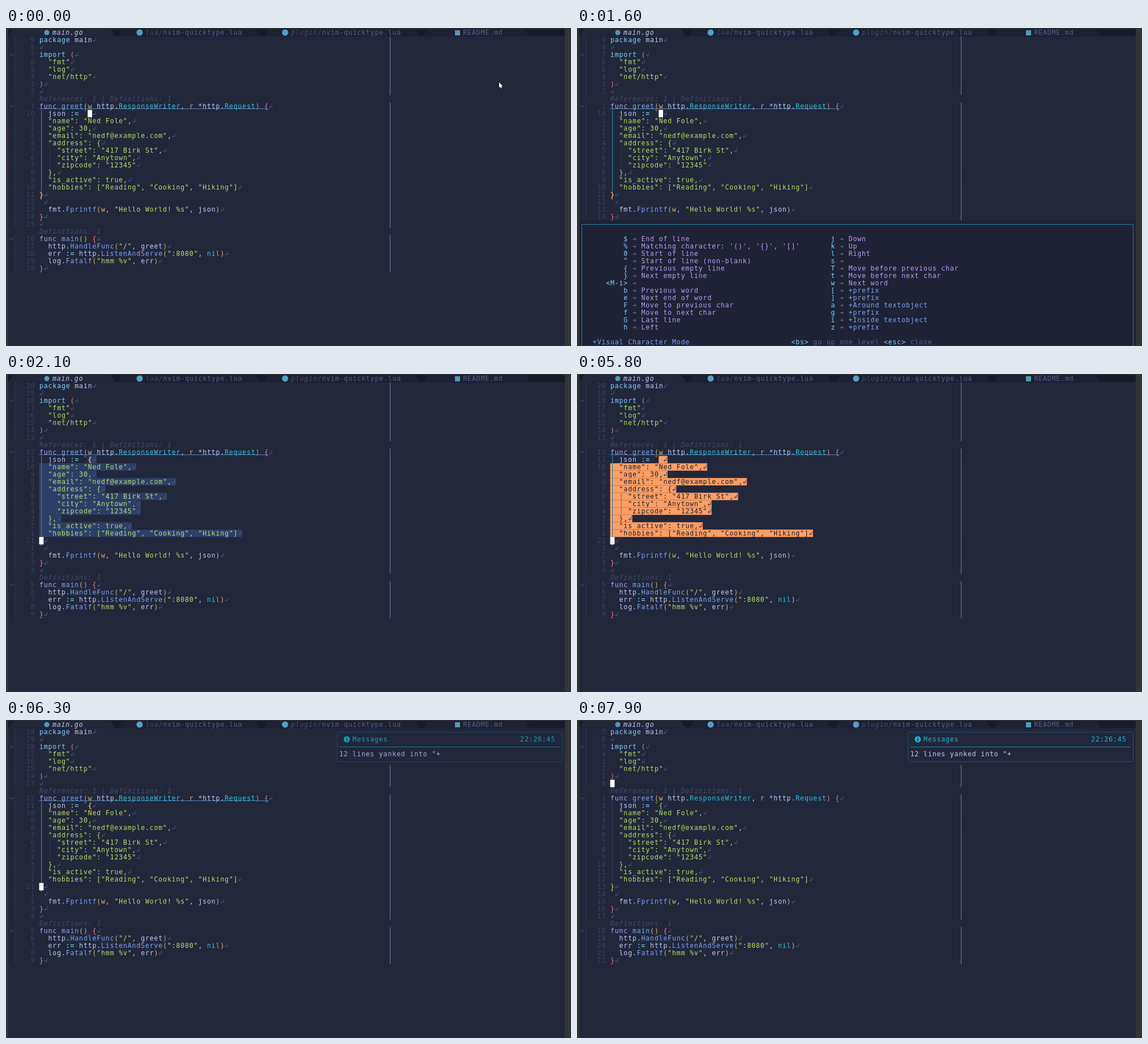
Write an HTML page with a canvas that moves like this. It is 998 by 561 pixels and loops after 8000 ms.

```html
<!DOCTYPE html>
<html lang="en">
<head>
<meta charset="utf-8">
<title>Editor session</title>
<style>
html, body { margin: 0; width: 100%; height: 100%; overflow: hidden; background: #333435; }
canvas { display: block; }
</style>
</head>
<body>
<canvas id="stage" width="998" height="561"></canvas>
<script>
const ctx = document.getElementById('stage').getContext('2d');
const LOOP = 8000, STEP = 100;
const X0 = 58.6, CELL = 7.79, ROW_H = 13;
const FONT = '11.6px "DejaVu Sans Mono", monospace';
const FRAME = '#333435', BG = '#22273a', DARK = '#171b29', TAB = '#1d2132', PANEL = '#1f2335';

// Space the font out to the terminal's cell width.
ctx.font = FONT;
const SPACING = CELL - ctx.measureText('0').width;
ctx.letterSpacing = `${SPACING}px`;

const COLORS = {
  c: '#7dcfff', f: '#c0caf5', r: '#f7768e', s: '#b3de68', k: '#bb9af7', b: '#7aa2f7',
  y: '#e0af68', t: '#2ac3de', o: '#89ddff', m: '#ff9e64', v: '#434b69', n: '#3b4261', d: '#565f89'
};

// Segments are separated by "~"; the first letter of each is its colour key.
const ROWS = [
  'cpackage~f main',
  '',
  'cimport ~r(',
  's  "fmt"',
  's  "log"',
  's  "net/http"',
  'r)',
  '',
  'vReferences: 1 | Definitions: 1',
  'kfunc ~bgreet~y(w ~fhttp~o.~tResponseWriter~o, ~yr ~o*~fhttp~o.~tRequest~r) {',
  'f  json ~o:= ~s`~m{',
  's  "name": "Ned Fole",',
  's  "age": 30,',
  's  "email": "nedf@example.com",',
  's  "address": {',
  's    "street": "417 Birk St",',
  's    "city": "Anytown",',
  's    "zipcode": "12345"',
  's  },',
  's  "is_active": true,',
  's  "hobbies": ["Reading", "Cooking", "Hiking"]',
  'm}',
  's`',
  'f  fmt~o.~bFprintf~y(w~o, ~s"Hello World! %s"~o, ~fjson~y)',
  'r}',
  '',
  'vDefinitions: 1',
  'kfunc ~bmain~y() ~r{',
  'f  http~o.~bHandleFunc~y(~s"/"~o, ~fgreet~y)',
  'f  err ~o:= ~fhttp~o.~bListenAndServe~y(~s":8080"~o, ~tnil~y)',
  'f  log~o.~bFatalf~y(~s"hmm %v"~o, ~ferr~y)',
  'r}'
].map(src => src ? src.split('~').map(s => [s[0], s.slice(1)]) : []);
const FOLDS = [2, 9, 27];

const HINTS = [
  [['$', 'End of line'], ['%', "Matching character: '()', '{}', '[]'"], ['0', 'Start of line'],
   ['^', 'Start of line (non-blank)'], ['{', 'Previous empty line'], ['}', 'Next empty line'],
   ['<M-i>', ''], ['b', 'Previous word'], ['e', 'Next end of word'], ['F', 'Move to previous char'],
   ['f', 'Move to next char'], ['G', 'Last line'], ['h', 'Left']],
  [['j', 'Down'], ['k', 'Up'], ['l', 'Right'], ['s', ''], ['T', 'Move before previous char'],
   ['t', 'Move before next char'], ['w', 'Next word'], ['[', '+prefix'], [']', '+prefix'],
   ['a', '+Around textobject'], ['g', '+prefix'], ['i', '+Inside textobject'], ['z', '+prefix']]
];

const colX = col => X0 + col * CELL;
const rowY = row => 21 + row * ROW_H;
const rowOfLine = line => line <= 8 ? line - 1 : line <= 25 ? line : line + 1;
const lineOfRow = row => row < 8 ? row + 1 : row < 26 ? row : row - 1;

function rect(x, y, w, h, color) {
  ctx.fillStyle = color;
  ctx.fillRect(x, y, w, h);
}

function textAt(str, x, y, color, style = '') {
  ctx.font = `${style} ${FONT}`;
  ctx.fillStyle = color;
  ctx.fillText(str, x + SPACING / 2, y + 4);
}

const text = (str, col, row, color, style) => textAt(str, colX(col), rowY(row), color, style);

function path(points, color, width = 1) {
  ctx.strokeStyle = color;
  ctx.lineWidth = width;
  ctx.beginPath();
  points.forEach(([x, y]) => ctx.lineTo(x, y));
  ctx.stroke();
}

function dot(x, y, r, color) {
  ctx.fillStyle = color;
  ctx.beginPath();
  ctx.arc(x, y, r, 0, 7);
  ctx.fill();
}

function newlineMark(col, row, color) {
  const x = colX(col), y = rowY(row);
  path([[x + 6, y - 4], [x + 6, y + 1.5], [x + 1.5, y + 1.5]], color);
  path([[x + 3.7, y - .7], [x + 1.5, y + 1.5], [x + 3.7, y + 3.7]], color);
}

function hintArrow(col, row) {
  const x = colX(col), y = rowY(row) + .5;
  path([[x + 1, y], [x + 6.5, y]], '#6b7499');
  path([[x + 4.3, y - 2.2], [x + 6.5, y], [x + 4.3, y + 2.2]], '#6b7499');
}

function drawTabs() {
  rect(4, 1.5, 983, 13, DARK);
  [[4, 192], [198, 449], [456, 730], [737, 925]].forEach(([left, right], i) => {
    ctx.fillStyle = i ? TAB : BG;
    ctx.beginPath();
    ctx.moveTo(left, 14.5);
    ctx.lineTo(left + 8, 1.5);
    ctx.lineTo(right - 8, 1.5);
    ctx.lineTo(right, 14.5);
    ctx.fill();
  });
  dot(72, 8, 4.5, '#519aba');
  dot(236, 8, 5.5, '#51a0cf');
  dot(493, 8, 5.5, '#51a0cf');
  rect(793, 4, 9, 9, '#519aba');
  textAt('main.go', 81.5, 8, COLORS.f, 'italic');
  textAt('lua/', 246, 8, '#474f70', 'italic');
  textAt('nvim-quicktype.lua', 277, 8, COLORS.d);
  textAt('plugin/', 503, 8, '#474f70', 'italic');
  textAt('nvim-quicktype.lua', 557.5, 8, COLORS.d);
  textAt('README.md', 807, 8, COLORS.d);
}

function drawGutter(row, line, cursorLine) {
  const y = rowY(row), top = y - 6.5;
  ctx.setLineDash([3, 1.33]);
  path([[16, top], [16, top + ROW_H]], '#244f5e');
  ctx.setLineDash([]);
  if (FOLDS.includes(row)) path([[6.5, y - 1.5], [9.7, y + 1.7], [13, y - 1.5]], COLORS.d);
  const shown = line === cursorLine ? line : Math.abs(line - cursorLine);
  text(String(shown).padStart(2), -3, row, COLORS.n);
  rect(677.9, top, 1.3, ROW_H, '#646d92');
}

function drawCode(state) {
  const { cursorLine, cursorCol, selected, yanked } = state;
  const matching = cursorLine === 10 || cursorLine === 21;
  ROWS.forEach((segments, row) => {
    if (segments.length && segments[0][0] === 'v') {
      text(segments[0][1], 0, row, COLORS.v, 'italic');
      return;
    }
    const line = lineOfRow(row);
    drawGutter(row, line, cursorLine);
    const length = segments.reduce((sum, s) => sum + s[1].length, 0);
    const marked = (selected || yanked) && line >= 10 && line <= 20;
    const start = line === 10 ? 11 : 0;
    if (marked) {
      rect(colX(start), rowY(row) - 6.5, (length + 1 - start) * CELL, ROW_H, yanked ? COLORS.m : '#2e3e69');
    }
    let col = 0;
    for (const [key, str] of segments) {
      const bracket = key === 'm';
      let color = bracket && !matching ? COLORS.s : COLORS[key];
      if (marked && yanked && col >= start && !bracket) color = '#1d202f';
      text(str, col, row, color, bracket && matching ? 'bold' : '');
      col += str.length;
    }
    newlineMark(col, row, marked && yanked ? '#3b4261' : '#4a5274');
  });

  const inScope = cursorLine >= 9;
  rect(62, rowY(10) - 6.5, 1.2, 11 * ROW_H, inScope ? '#2a8ba4' : '#343b56');
  rect(77.6, rowY(15) - 6.5, 1, 3 * ROW_H, yanked ? '#8a6658' : '#343b56');
  if (inScope) rect(X0, 142, 52 * CELL, 1, '#4d86b5');
  rect(colX(cursorCol), rowY(rowOfLine(cursorLine)) - 6.5, CELL, ROW_H, '#fff');
}

function drawHints() {
  rect(4, 339.5, 983, 220.5, PANEL);
  path([[8.5, 561], [8.5, 346.5], [982.5, 346.5], [982.5, 561]], '#26809a');
  HINTS.forEach((list, side) => list.forEach(([key, label], i) => {
    const col = side ? 50 : 3, row = 27 + i;
    text(key, col + 1 - key.length, row, COLORS.c);
    hintArrow(col + 2, row);
    text(label, col + 4, row, label[0] === '+' ? COLORS.b : COLORS.k);
  }));
  text('+Visual Character Mode', -4, 41, COLORS.b);
  text('<bs>', 41, 41, COLORS.c);
  text('go up one level', 46, 41, COLORS.d);
  text('<esc>', 62, 41, COLORS.c);
  text('close', 68, 41, COLORS.d);
}

function drawMessage(progress) {
  rect(581, 14.5, 406, 65, BG);
  ctx.globalAlpha = 1 - (1 - progress) ** 4;
  ctx.strokeStyle = '#27506a';
  ctx.lineWidth = 1;
  ctx.beginPath();
  ctx.roundRect(585, 21.5, 397.5, 52, 3);
  ctx.stroke();
  const info = '#16b5d2';
  dot(602, 34, 5.5, info);
  rect(601.2, 30.5, 1.6, 1.6, BG);
  rect(601.2, 33, 1.6, 4.5, BG);
  text('Messages', 71, 1, info);
  text('22:26:45', 109, 1, info);
  rect(589, 47, 389, 1.1, '#1e7f97');
  text('12 lines yanked into "+', 68, 3, COLORS.f);
  ctx.globalAlpha = 1;
}

function drawPointer() {
  ctx.beginPath();
  [[871, 96], [871, 105], [873, 103.4], [874.6, 106.4], [876, 105.6], [874.6, 102.8], [877.4, 102.4]]
    .forEach(([x, y]) => ctx.lineTo(x, y));
  ctx.closePath();
  ctx.fillStyle = '#fff';
  ctx.fill();
}

function cursorLineAt(t) {
  if (t < 1800) return 10;
  if (t < 6700) return 21;
  if (t < 7500) return t < 7100 ? 20 : 19;
  return Math.max(8, Math.round(18 - (t - 7500) / 40));
}

function draw(now) {
  const t = Math.floor(now % LOOP / STEP) * STEP;
  rect(0, 0, 998, 561, FRAME);
  rect(4, 1.5, 983, 558.5, BG);
  drawTabs();
  drawCode({
    cursorLine: cursorLineAt(t),
    cursorCol: t < 1800 ? 11 : 0,
    selected: t >= 1800 && t < 5800,
    yanked: t >= 5800 && t < 6000
  });
  if (t < 1200) drawPointer();
  if (t >= 1400 && t < 1800) drawHints();
  if (t >= 5900) drawMessage(Math.min(1, (t - 5800) / 1500));
  requestAnimationFrame(draw);
}
requestAnimationFrame(draw);
</script>
</body>
</html>
```
